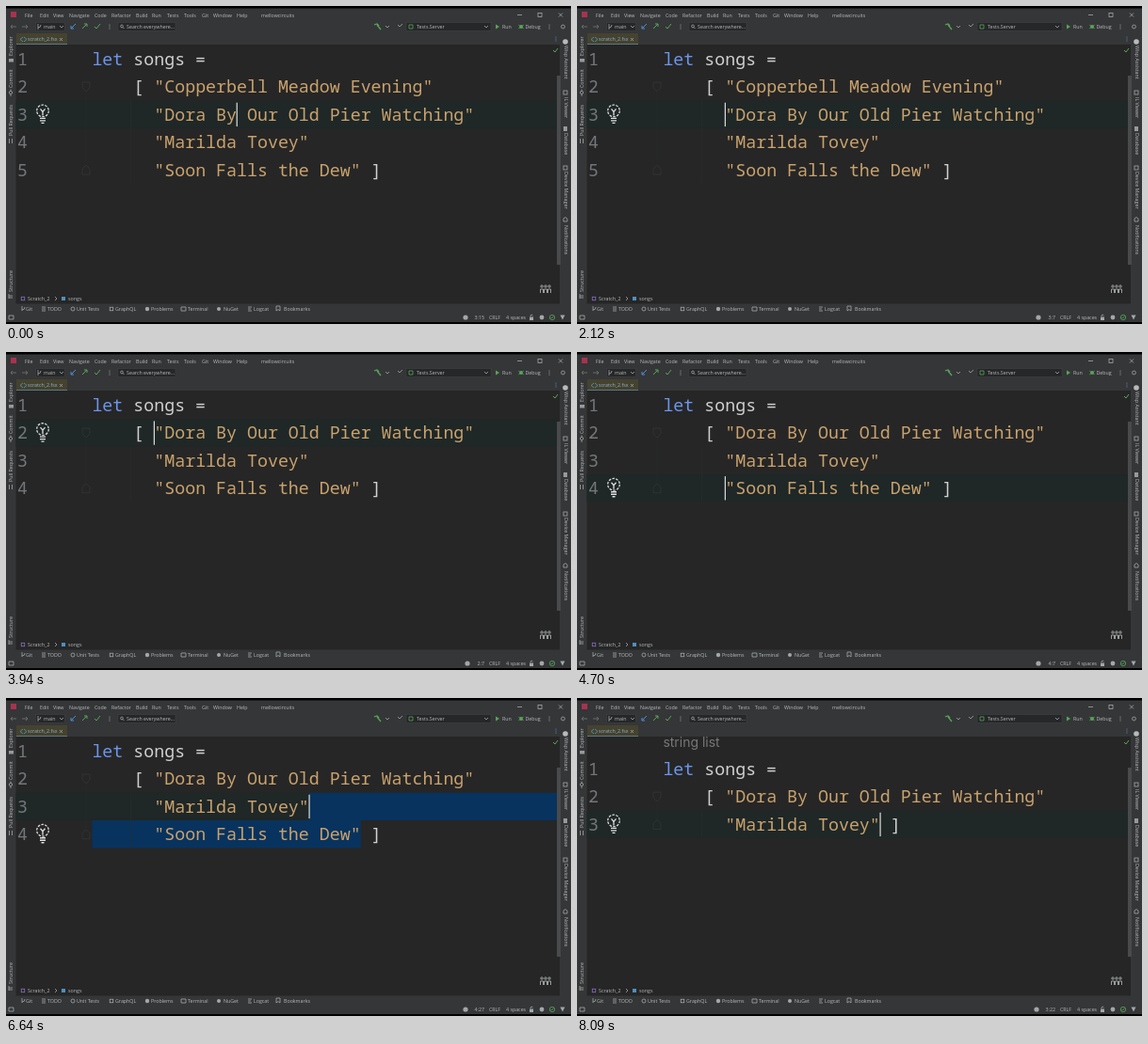
An HTML page for the animation above (8120 ms loop, 600x338 px).

```html
<!DOCTYPE html>
<html lang="en">
<head>
<meta charset="utf-8">
<title>Editor</title>
<style>
  html, body { margin: 0; width: 100%; height: 100%; overflow: hidden; background: #353637; }
  svg { display: block; width: 100vw; height: 100vh; }
  text { white-space: pre; font: 5.3px "Open Sans", "Noto Sans", sans-serif; fill: #b8babc; }
  .code { font: 18.3px "Noto Sans Mono", "DejaVu Sans Mono", monospace; fill: #d0d0d0; }
  .key { fill: #6c95eb; }
  .str { fill: #c9a26d; }
  .num { fill: #74777a; }
  .hint { font: 14px Inter, sans-serif; fill: #777; }
  .tab { fill: #8db4cf; }
</style>
</head>
<body>
<svg viewBox="0 0 600 338"><g id="chrome"></g><g id="editor"></g></svg>
<script>
const LOOP = 8120, LEFT = 91.4, CELL = 10.98, ROW = 29.35, LAG = 150, HINT_AT = 7700;
const FRAME = "#353637", FIELD = "#262728", PAPER = "#262626", SELECTION = "#08335e";
const titles = [
  "Copperbell Meadow Evening",
  "Dora By Our Old Pier Watching",
  "Marilda Tovey",
  "Soon Falls the Dew"
];

// Each step: time, caret row, caret column, removed titles, selection end column, selected chars
const steps = [
  [0, 3, 15, 0],
  [1900, 3, 7, 0],
  [2500, 2, 7, 0, 7, 34],
  [3450, 2, 7, 1],
  [4250, 3, 7, 1],
  [4450, 4, 7, 1],
  [4750, 4, 29, 1],
  [5700, 4, 28, 1],
  [5950, 4, 27, 1],
  [6540, 3, 22, 1, 27, 27],
  [7300, 3, 22, 2]
];

const rect = (x, y, w, h, fill, extra = "") =>
  `<rect x="${x}" y="${y}" width="${w}" height="${h}" fill="${fill}" ${extra}/>`;
const text = (x, y, s, extra = "") => `<text x="${x}" y="${y}" ${extra}>${s}</text>`;
const path = (d, color = "#a4a7aa", width = 0.8, extra = "") =>
  `<path d="${d}" fill="none" stroke="${color}" stroke-width="${width}" ${extra}/>`;
const dot = (x, y, r, fill) => `<circle cx="${x}" cy="${y}" r="${r}" fill="${fill}"/>`;
const ring = (x, y, r, color = "#a4a7aa") =>
  `<circle cx="${x}" cy="${y}" r="${r}" fill="none" stroke="${color}" stroke-width=".8"/>`;
const box = (x, y, s, color = "#a4a7aa") =>
  rect(x - s / 2, y - s / 2, s, s, "none", `stroke="${color}" stroke-width=".8"`);
const field = (x, w) => rect(x, 17.5, w, 9, FIELD, 'stroke="#444648" stroke-width=".5"');
const chevron = (x, y) => path(`M${x - 2} ${y - 1}l2 2 2-2`);
const dots = (x, y, color) => [-2, 0, 2].map(d => dot(x, y + d, 0.6, color)).join("");
const sideText = (x, y, s, angle) => text(0, 0, s, `transform="translate(${x} ${y}) rotate(${angle})"`);
const row = (y, items) => items.map(([x, s]) => text(x, y, s)).join("");

function titleBar() {
  return rect(5, 6, 6, 6, "#a83250") +
    row(11.5, [[20, "File"], [36, "Edit"], [50, "View"], [67, "Navigate"], [94, "Code"],
      [112, "Refactor"], [138, "Build"], [155, "Run"], [171, "Tests"], [189, "Tools"],
      [208, "Git"], [220, "Window"], [245, "Help"], [271, "mellowcircuits"]]) +
    path("M543 9.5h5M587 7.5l4 4m0-4l-4 4") + box(567, 9.5, 4);
}

function toolBar() {
  const green = "#58a45c";
  return path("M11 22H5l2-2m-2 2l2 2", "#777") + path("M17 22h6l-2-2m2 2l-2 2", "#777") +
    field(31.5, 31) + path("M34 25v-6m0 4q3 0 3-3") + text(40, 24, "main") + chevron(59, 22) +
    path("M74 19l-5 5m0-3v3h3", "#4d8fdb", 1) +
    path("M81 24l5-5m-3 0h3v3", green, 1) + path("M94 22l2 2 4-5", green, 1) + dots(110, 22, "#a4a7aa") +
    field(119, 61) + ring(123, 21.5, 1.4) + path("M124 22.5l1.5 1.5") + text(128, 24, "Search everywhere...") +
    path("M391 20l3-1 2 2m-2-1l4 5", green, 1.3) + path("M416 20l2 2 3-3") + chevron(405, 22) +
    field(425, 90) + path("M428 20h4v4h-4z", green) + text(436, 24, "Tests.Server") + chevron(510, 22) +
    `<path d="M520 19.5l4 2.5-4 2.5z" fill="${green}"/>` + text(527, 24, "Run") +
    dot(547, 22, 2, green) + path("M544 20l6 4m0-4l-6 4", green, 0.6) + text(551.5, 24, "Debug") +
    dots(577, 22, "#a4a7aa") + ring(591.5, 22, 1.9);
}

function tabs() {
  return rect(11, 29, 54, 12, "#45422f") + rect(11, 40, 54, 1.2, "#5d7988") +
    path("M18 33l-3 2.5 3 2.5m1-5l3 2.5-3 2.5", "#4f9fc4") + text(23, 37, "scratch_2.fsx", 'class="tab"') +
    path("M57 34l3 3m0-3l-3 3") + dots(584, 35, "#5b91c9");
}

function sideBars() {
  const left = [["Explorer", 53], ["Commit", 87], ["Pull Requests", 138], ["Structure", 304]];
  const right = [["Wisp Assistant", 42], ["IL Viewer", 97], ["Database", 135],
    ["Device Manager", 176], ["Notifications", 233]];
  return left.map(([s, y]) => sideText(7, y, s, -90)).join("") +
    rect(3, 56, 5, 3.5, "#97999c") + ring(5, 92, 1.6) + path("M5 88.5v2m0 3.5v2") +
    path("M3.5 141v5m3-5v5") + path("M3 308h4M3 310h4M3 306v5") +
    right.map(([s, y]) => sideText(592.5, y, s, 90)).join("") +
    dot(594, 38, 2.8, "#b8babc") + box(594, 92, 4) + rect(592, 128, 4, 5, "#97999c") +
    box(594, 172, 4) + path("M592 229v-3q2-3 4 0v3z");
}

function footer() {
  const items = [["Git", 21], ["TODO", 44], ["Unit Tests", 75], ["GraphQL", 116], ["Problems", 154],
    ["Terminal", 193], ["NuGet", 231], ["Logcat", 263], ["Bookmarks", 295]];
  return rect(10.5, 305, 577.5, 11.5, PAPER) +
    box(18, 311, 3.5, "#8a6fc4") + text(23, 313, "Scratch_2") + path("M52 309l2 2-2 2") +
    rect(59, 309, 4, 4, "#4f8fbd") + text(66, 313, "songs") +
    path("M17 324v-5m0 4q3 0 3-3M38 320h4M38 322h4M38 324h4M186 320h5v4h-5zM291 319v5l-2-1.5-2 1.5v-5z") +
    ring(71, 322, 2) + box(112, 322, 3.5) + dot(150, 322, 2.2, "#a4a7aa") +
    dot(226, 322, 2, "#a4a7aa") + path("M257 320h4M257 322h3M257 324h4") +
    items.map(([s, x]) => text(x, 323.7, s)).join("") +
    path("M3 329h5v4H3z") + row(333, [[513, "CRLF"], [531, "4 spaces"]]) +
    rect(556, 330.5, 4, 3.5, "#a4a7aa") + path("M557 330v-1q1-2 2.5 0") + dot(569, 331, 2.4, "#a4a7aa") +
    ring(580, 331, 2.7, "#58a45c") + path("M578.5 331l1 1 2-2.5", "#58a45c") +
    `<path d="M588.5 328.5h5l-2.5 5z" fill="#a4a7aa"/>` +
    rect(0, 0, 600, 2.5, "#000") + rect(0, 336, 600, 2, "#000");
}

const colX = col => LEFT + CELL * (col - 1);
const stepAt = t => steps.findLast(s => s[0] <= t) || steps[0];

function bulb(y) {
  return `<circle cx="39" cy="${y - 4}" r="6.3" fill="none" stroke="#d8d8d8" stroke-width="1.3" stroke-dasharray="2.6 1.3"/>` +
    path(`M36.5 ${y - 6}l2.5 3 2.5-3M39 ${y - 3}v4M36 ${y + 4}h6M36 ${y + 6.5}h6M37.5 ${y + 9}h3`, "#e0e0e0", 1.3);
}

function broom(y) {
  return path(`M39 ${y - 13}v11`, "#e0e0e0", 2) +
    path(`M30 ${y + 9}q0-10 5-10h8q5 0 5 10M30 ${y + 3}h18M34 ${y + 3}v6M39 ${y + 3}v6M44 ${y + 3}v6`, "#e0e0e0", 1.5);
}

function editor(t) {
  const [, line, col, removed, endCol] = stepAt(t);
  const seen = stepAt(Math.max(0, t - LAG));
  const shift = t >= HINT_AT ? 19 : 0;
  const mid = n => 56.7 + shift + ROW * (n - 1);
  const top = n => mid(n) - ROW / 2;
  const songs = titles.slice(removed ? 1 : 0, removed > 1 ? 3 : 4);
  const last = songs.length + 1;
  const x = colX(col);
  let out = rect(10.5, 41, 577.5, 264, PAPER) + rect(10.5, top(line), 577, ROW, "#1f2727");

  if (endCol) {
    out += rect(x, top(line), 587.5 - x, ROW, SELECTION) +
      rect(LEFT, top(line + 1), colX(endCol) - LEFT, ROW, SELECTION);
  }
  if (line === last && col >= 28) {
    for (const [n, c] of [[2, 5], [last, 28]])
      out += rect(colX(c), top(n) + 2, CELL, ROW - 4, "#4a2050");
  }

  out += path(`M85 ${mid(2) + 6}V${mid(last) - 6}M132.5 ${top(3)}V${top(last + 1)}`, "#2b2c2d", 0.6);
  for (const [n, d] of [[2, 1], [last, -1]])
    out += path(`M81 ${mid(n) - 5 * d}h8v${6 * d}l-4 ${4 * d}-4 ${-4 * d}z`, "#393b3d", 0.6);

  const code = (c, n, s, kind = "") => text(colX(c), mid(n) + 6.4, s, `class="code ${kind}"`);
  for (let n = 1; n <= last; n++) out += text(12, mid(n) + 6.4, n, 'class="code num"');
  out += code(1, 1, "let", "key") + code(5, 1, "songs =") + code(5, 2, "[");
  songs.forEach((s, i) => out += code(7, i + 2, `"${s}"`, "str"));
  out += code(songs.at(-1).length + 10, last, "]");
  if (shift) out += text(LEFT, 52, "string list", 'class="hint"');

  out += rect(x - 0.5, top(line) + 2, 1.2, ROW - 4, "#dcdcdc");
  out += (seen[5] ? broom : bulb)(mid(seen[1]));
  out += rect(585, 74, 4, 201, "#484a4b") + path("M581 47l2 2 3-4", "#58a45c", 1);
  for (const px of [569, 573, 577])
    out += ring(px, 298, 1.2, "#b8babc") + path(`M${px - 1.5} 305v-4h3v4`, "#b8babc");

  const place = `${seen[1]}:${seen[2]}` + (seen[5] ? ` (${seen[5]} chars, 1 line break)` : "");
  const iconX = seen[5] ? 436 : place.length > 3 ? 488 : 490;
  return out + text(508, 333, place, 'text-anchor="end"') + dot(iconX, 331, 2.6, "#a4a7aa");
}

const find = id => document.getElementById(id);
find("chrome").innerHTML = rect(0, 0, 600, 338, FRAME) +
  titleBar() + toolBar() + tabs() + sideBars() + footer();

let shown = "";
const start = performance.now();
function draw(now) {
  const next = editor(Math.max(0, now - start) % LOOP);
  if (next !== shown) find("editor").innerHTML = shown = next;
  requestAnimationFrame(draw);
}
draw(start);
</script>
</body>
</html>
```
